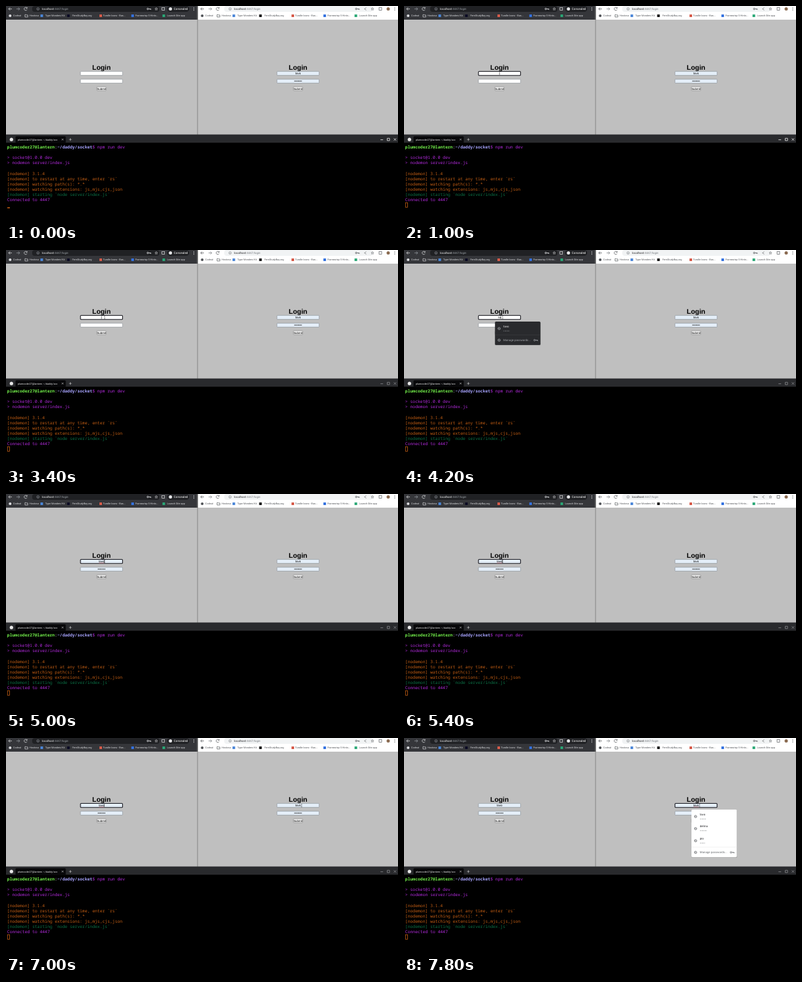
Recreate the animation shown at these times as an HTML page. Size 600 px wide and 332 px high, loop 8000 ms.

```html
<!DOCTYPE html>
<html lang="en">
<head>
<meta charset="utf-8">
<title>Two logins and a terminal</title>
<style>
  html, body { margin: 0; width: 100%; height: 100%; overflow: hidden; background: #000; }
  svg { display: block; width: 100%; height: 100%; }
  text { white-space: pre; text-rendering: geometricPrecision; font-family: Roboto, sans-serif; }
  .page { font-family: "Liberation Sans", Arial, sans-serif; }
  .mono { font-family: "Noto Sans Mono", monospace; }
</style>
</head>
<body>
<svg id="stage" viewBox="0 0 600 332" preserveAspectRatio="none">
  <g id="backdrop"></g>
  <g id="live"></g>
</svg>
<script>
const LOOP = 8000, STEP = 200;
const USER = 'tavo';
const ACCOUNT = 'plumcoder27@lantern';

// Drawing helpers
const rect = (x, y, w, h, fill, more = '') =>
  `<rect x="${x}" y="${y}" width="${w}" height="${h}" fill="${fill}" ${more}/>`;
const dot = (x, y, r, fill, more = '') =>
  `<circle cx="${x}" cy="${y}" r="${r}" fill="${fill}" ${more}/>`;
const line = (d, color, width = 0.7) =>
  `<path d="${d}" fill="none" stroke="${color}" stroke-width="${width}"/>`;
const text = (x, y, size, fill, content, more = '') =>
  `<text x="${x}" y="${y}" font-size="${size}" fill="${fill}" ${more}>${content}</text>`;
const pageText = (x, y, size, content, more = '') =>
  text(x, y, size, '#000', content, `class="page" text-anchor="middle" ${more}`);

const keyIcon = (x, y, color) =>
  dot(x, y, 1.2, 'none', `stroke="${color}" stroke-width=".8"`) +
  line(`M${x + 1.2} ${y}h3.6v1.3m-1.3 -1.3v1`, color, 0.8);

const menuIcon = (x, color) => [2.6, 4.6, 6.6].map(y => dot(x, y, 0.55, color)).join('');

const starIcon = (x, color) => {
  const points = Array.from({ length: 10 }, (_, i) => {
    const r = i % 2 ? 0.95 : 2.2, a = i * Math.PI / 5 - Math.PI / 2;
    return `${(x + r * Math.cos(a)).toFixed(2)},${(4.6 + r * Math.sin(a)).toFixed(2)}`;
  });
  return `<polygon points="${points.join(' ')}" fill="none" stroke="${color}" stroke-width=".5"/>`;
};

const folder = (x, color) => line(`M${x - 2} 13.3h1.6l.6 .6h2.2v3h-4.4z`, color, 0.7);

function bookmarks(x, ink, dark) {
  const items = [
    [11, 'Codnut'], [36, 'Hostova'], [60, 'Type Wonders Kit'], [101.5, 'FernStudyBay.org'],
    [148.5, 'Tundle Icons - Bas...'], [198, 'Framewisp 5 Hints...'], [246.5, 'Launch Site app']
  ];
  const marks = [[54.7, '#4b86d8'], [95.5, dark ? '#0a0a23' : '#111'], [145, '#d65b4a'],
                 [193.8, '#3472e0'], [241.5, '#2aa876']];
  return `<g transform="translate(${x})">` +
    dot(6.3, 15, 2.1, ink) + folder(31, ink) +
    marks.map(([mx, color]) => rect(mx - 2, 13, 4, 4, color)).join('') +
    items.map(([tx, label]) => text(tx, 16.4, 3.85, ink, label)).join('') + '</g>';
}

function toolbar(x, width, dark) {
  const ink = dark ? '#e4e5e7' : '#4b4e52', dim = dark ? '#9aa0a6' : '#777b80';
  const at = n => x + n;
  return rect(x, 0, width, 21, dark ? '#35363a' : '#fff') +
    rect(at(40), 0, dark ? 195 : 227, 9, dark ? '#202124' : '#f1f3f4', 'rx="4"') +
    line(`M${at(9)} 4.5h-5m2.3 -2.3l-2.3 2.3l2.3 2.3`, ink) +
    line(`M${at(16)} 4.5h5m-2.3 -2.3l2.3 2.3l-2.3 2.3`, dim) +
    line(`M${at(32)} 3.2a2.3 2.3 0 1 0 .2 2.2M${at(32.3)} 1.8v1.7h-1.7`, ink) +
    dot(at(49), 4.5, 1.9, 'none', `stroke="${dim}" stroke-width=".6"`) +
    line(`M${at(49)} 4.1v1.4`, dim) +
    text(at(55.3), 6.1, 4.4, dark ? '#fff' : '#202124',
      `localhost<tspan fill="${dim}">:4447/login</tspan>`) +
    bookmarks(x, dark ? '#dcdde0' : '#505357', dark);
}

function fieldBox(center, y, filled, focused) {
  const fill = filled ? '#e4eef8' : '#fff';
  return focused
    ? rect(center - 32.2, y + 0.2, 64.4, 6.2, fill, 'rx="1" stroke="#15151c" stroke-width="1.1"')
    : rect(center - 32.2, y + 0.3, 64.4, 6, fill, 'rx=".5" stroke="#858b92" stroke-width=".6"');
}

function loginForm(center, { name = '', filled, focused, caret }) {
  const half = name.length * 1.05;
  return pageText(center, 98, 10.4, 'Login', 'font-weight="700"') +
    fieldBox(center, 100.3, filled, focused) +
    fieldBox(center, 112.2, filled, false) +
    pageText(center, 105.2, 4.5, name) +
    (focused && name === USER ? line(`M${center - 4} 106h8`, '#c43a4a', 0.45) : '') +
    (caret ? line(`M${center + half} 101.3v4.6`, '#000', 0.5) : '') +
    (filled ? pageText(center, 117.1, 4.9, '•'.repeat(7)) : '') +
    rect(center - 7, 124.2, 14, 5.8, '#f0f0f0', 'rx=".6" stroke="#777" stroke-width=".5"') +
    pageText(center, 128.7, 4.4, 'Submit');
}

function passwordPopup(x, accounts, dark) {
  const bg = dark ? '#292a2d' : '#fff', ink = dark ? '#f1f1f1' : '#202124';
  const dim = dark ? '#a3a6aa' : '#66696d';
  const bottom = 110 + accounts.length * 18.6 + 17.4, foot = bottom - 7.4;
  const globe = y => dot(x + 6.3, y, 1.8, 'none', `stroke="${dim}" stroke-width=".8"`) +
    line(`M${x + 4.6} ${y - 0.5}l3.3 1`, dim, 0.6);
  const rows = accounts.map(([name, length], i) => {
    const y = 110 + i * 18.6;
    return globe(y + 10.7) + text(x + 12.8, y + 8.8, 4.4, ink, name) +
      text(x + 12.8, y + 15.6, 4, dim, '•'.repeat(length));
  }).join('');
  return rect(x, 110.6, 70, bottom - 110, '#000', 'rx="1.6" opacity=".22"') +
    rect(x, 110, 69.5, bottom - 110, bg, 'rx="1.6"') + rows +
    line(`M${x} ${foot - 8}h69.5`, dark ? '#3e4044' : '#e4e5e7', 0.5) +
    globe(foot) + text(x + 12.8, foot + 1.6, 4.4, dim, 'Manage passwords...') +
    keyIcon(x + 60.5, foot, dim);
}

function terminalText() {
  const purple = '#b52be0', orange = '#c65f14', green = '#0b7347';
  const prompt = `<tspan font-weight="700" fill="#73f04b">${ACCOUNT}</tspan>` +
    '<tspan fill="#fff">:</tspan><tspan font-weight="700" fill="#a8a4ff">~/daddy/socket</tspan>$ npm run dev';
  const rows = [
    [0, purple, prompt],
    [2, purple, '&gt; socket@1.0.0 dev'],
    [3, purple, '&gt; nodemon server/index.js'],
    [5, orange, '[nodemon] 3.1.4'],
    [6, orange, '[nodemon] to restart at any time, enter `rs`'],
    [7, orange, '[nodemon] watching path(s): *.*'],
    [8, orange, '[nodemon] watching extensions: js,mjs,cjs,json'],
    [9, green, '[nodemon] starting `node server/index.js`'],
    [10, purple, 'Connected to 4447']
  ];
  return rows.map(([row, color, content]) =>
    text(1.8, 219.4 + row * 8.03, 6.4, color, content, 'class="mono"')).join('');
}

function backdrop() {
  const light = '#e4e5e7', grey = '#55585c';
  return rect(0, 21, 600, 177, '#bfbfbf') +
    toolbar(0, 293, true) + toolbar(294, 306, false) +
    keyIcon(217, 4.5, light) + starIcon(230, light) +
    rect(238.7, 2.5, 4, 4, 'none', `stroke="${light}" stroke-width=".7"`) +
    rect(246.5, 0, 34, 9, '#202124', 'rx="4.5"') + dot(251.7, 4.5, 2.5, light) +
    text(256.8, 6.1, 4.6, '#fff', 'Concealed') + menuIcon(287.5, light) +
    keyIcon(536, 4.5, grey) +
    line('M551.5 2.6l-3 1.9l3 1.9', grey, 0.6) + starIcon(561, grey) +
    rect(571, 2.5, 4, 4, 'none', `stroke="${grey}" stroke-width=".7"`) +
    dot(585, 4.5, 2.5, '#8a6a50') + menuIcon(595, grey) +
    rect(292.6, 0, 1.2, 198, '#8f8f8f') +
    rect(0, 197.5, 600, 13, '#292a2d') + rect(0, 210.3, 600, 121.7, '#000') +
    rect(14.5, 200.2, 77, 10.3, '#08080a', 'rx="1.5"') +
    dot(8.3, 205.2, 2.6, '#e8e8e8') +
    text(18, 206.7, 3.75, '#ececec', `${ACCOUNT}: ~/daddy/soc`) +
    line('M85.3 203.9l2.6 2.6m0 -2.6l-2.6 2.6M96.5 205.2h4m-2 -2v4', '#d8d8d8', 0.6) +
    terminalText();
}

function terminalFocus(t) {
  const buttons = t < 1400 ? '#f0f0f0' : '#898b8e';
  return line('M573.2 205.6h4M583.5 203.3h3.6v3.6h-3.6zM593.6 203.3l3.6 3.6m0 -3.6l-3.6 3.6', buttons, 0.8) +
    (t < 600 ? rect(2, 309.4, 4, 1.5, '#c65f14')
             : rect(2.3, 302.3, 3.2, 7, 'none', 'stroke="#c65f14" stroke-width=".8"'));
}

// Pointer positions: [time, x, y]
const pointerPath = [
  [200, 172, 168], [800, 151, 104], [1000, 153, 94], [1200, 152, 100], [1400, 151, 103.7],
  [6000, 151, 103.7], [6800, 452.5, 103.9], [LOOP, 452.5, 103.9]
];

function pointer(t) {
  if (t < pointerPath[0][0]) return '';
  const i = pointerPath.findIndex(p => p[0] > t);
  const [t0, x0, y0] = pointerPath[i - 1], [t1, x1, y1] = pointerPath[i];
  const k = (t - t0) / (t1 - t0), ease = k * k * (3 - 2 * k);
  const x = x0 + (x1 - x0) * ease, y = y0 + (y1 - y0) * ease;
  const overText = y < 108 && (Math.abs(x - 146) < 32 || Math.abs(x - 447) < 32);
  return overText
    ? line(`M${x - 0.8} ${y - 2}h1.6m-.8 0v4m-.8 0h1.6`, '#333', 0.45)
    : `<path d="M${x} ${y}v5.4l1.3 -1.2l1 2.1l.9 -.4l-1 -2h1.8z" fill="#000" stroke="#fff" stroke-width=".4"/>`;
}

function scene(t) {
  const blink = Math.floor(t / 500) % 2 === 0;
  const leftFocus = (t >= 600 && t < 1400) || (t >= 3200 && t < 7200);
  const leftFilled = t >= 5000;
  const typed = t < 4200 ? 0 : Math.min(4, 2 + Math.floor((t - 4200) / 200));
  const rightFocus = t >= 7200;
  return terminalFocus(t) +
    loginForm(146.2, { name: USER.slice(0, typed), filled: leftFilled,
                       focused: leftFocus, caret: leftFocus && blink }) +
    loginForm(447, { name: USER, filled: true, focused: rightFocus, caret: rightFocus && blink }) +
    (t >= 4200 && !leftFilled ? passwordPopup(139.3, [[USER, 7]], true) : '') +
    (t >= 7400 ? passwordPopup(440, [[USER, 7], ['delma', 8], ['pio', 6]], false) : '') +
    pointer(t);
}

document.getElementById('backdrop').innerHTML = backdrop();
const live = document.getElementById('live');
let shown = -1;

function tick() {
  const t = Math.floor(performance.now() % LOOP / STEP) * STEP;
  if (t !== shown) live.innerHTML = scene(shown = t);
  requestAnimationFrame(tick);
}
tick();
</script>
</body>
</html>
```
